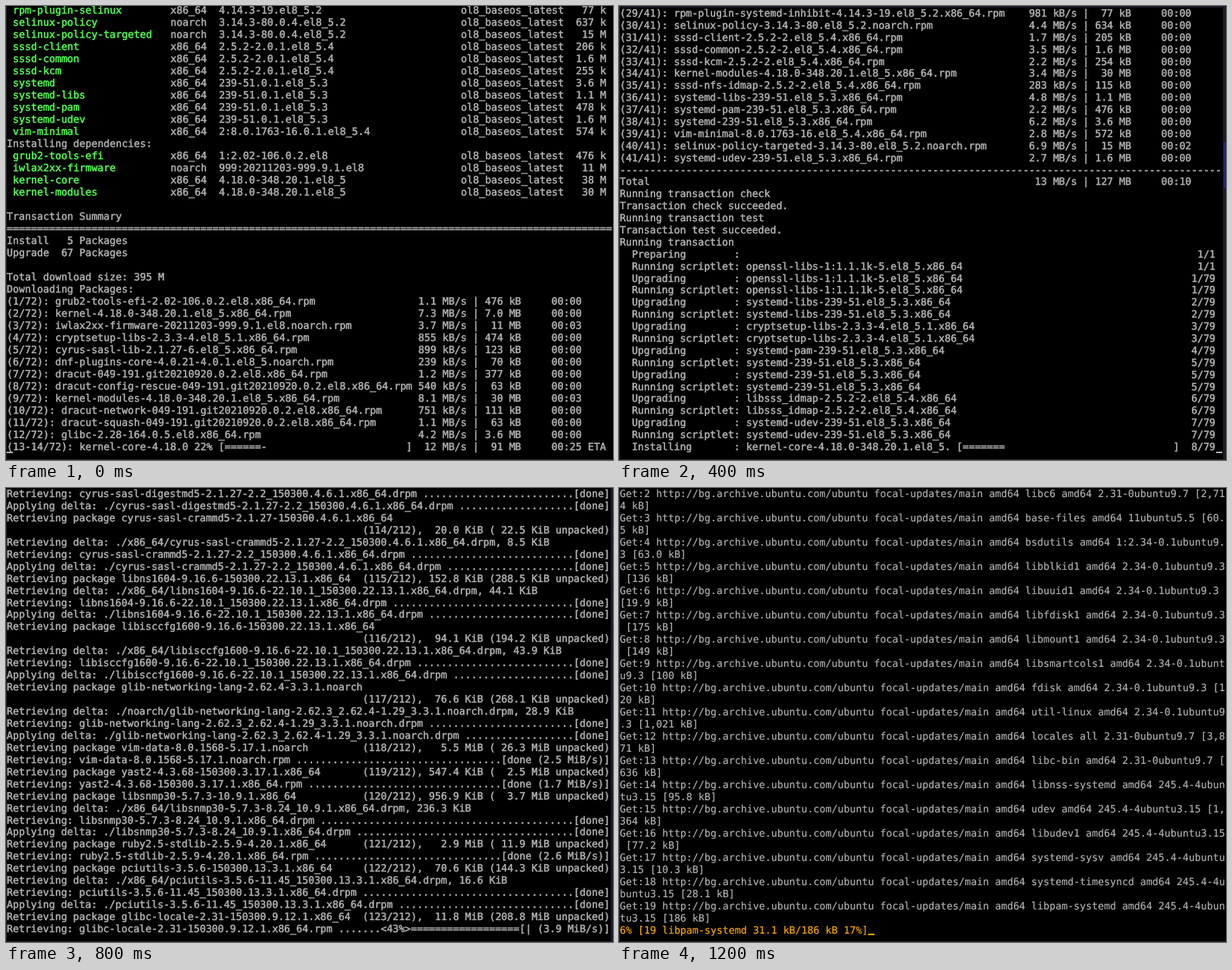
An HTML page for the animation above (1.6 s loop, 801 by 599 pixels).

```html
<!DOCTYPE html>
<html lang="en">
<head>
<meta charset="utf-8">
<title>Package updates</title>
<style>
  html, body { margin: 0; width: 100%; height: 100%; overflow: hidden; background: #000; }
  svg { display: block; width: 801px; height: 599px; }
  text {
    font-family: "DejaVu Sans Mono", "Liberation Mono", monospace;
    white-space: pre;
    text-rendering: geometricPrecision;
  }
</style>
</head>
<body>
<svg id="stage" viewBox="0 0 801 599"></svg>
<script>
const NS = "http://www.w3.org/2000/svg";
const stage = document.getElementById("stage");
const HOLD = 400;
const GREY = "#b2b2b2", GREEN = "#55ff55", AMBER = "#ffaa00";

function add(parent, tag, attrs, text) {
  const el = document.createElementNS(NS, tag);
  for (const k in attrs) el.setAttribute(k, attrs[k]);
  if (text) el.textContent = text;
  parent.appendChild(el);
  return el;
}

// A row is a string or a list of [colour, string] runs.
function screen({ rows, top, cell, pitch, weight, cursor }) {
  const g = add(stage, "g", {
    "font-size": cell / 0.60205, "stroke-width": weight, visibility: "hidden"
  });
  rows.forEach((row, i) => {
    let col = 0;
    for (const [fill, s] of Array.isArray(row) ? row : [[GREY, row]]) {
      if (s.trim()) add(g, "text", { x: 1 + col * cell, y: top + i * pitch, fill, stroke: fill }, s);
      col += s.length;
    }
  });
  if (cursor) add(g, "rect", { x: 1 + cursor[0] * cell, y: 588, width: 8, height: 2, fill: cursor[1] });
  return g;
}

const lines = s => s.trim().split("\n");
const fields = s => lines(s).map(l => l.split(" "));
const unit = s => s.replace(/([kM]\S*)$/, " $1");

// dnf download line
const fetched = (name, rate, size, time) =>
  name.padEnd(67) + unit(rate).padStart(9) + " | " + unit(size).padStart(6) + "     " + time;
const downloads = (first, total, list) => fields(list).map(([name, rate, size, time = "00:00"], i) =>
  fetched(`(${first + i}/${total}): ${name}.rpm`, rate, size, time));

// dnf package table
const table = list => fields(list).map(([name, arch, version, size]) => [
  [GREEN, (" " + name).padEnd(27)],
  [GREY, arch.padEnd(8) + version.padEnd(40) + "ol8_baseos_latest  " + unit(size).padStart(5)]
]);

const upgradeList = [
  ...table(`
rpm-plugin-selinux x86_64 4.14.3-19.el8_5.2 77k
selinux-policy noarch 3.14.3-80.0.4.el8_5.2 637k
selinux-policy-targeted noarch 3.14.3-80.0.4.el8_5.2 15M
sssd-client x86_64 2.5.2-2.0.1.el8_5.4 206k
sssd-common x86_64 2.5.2-2.0.1.el8_5.4 1.6M
sssd-kcm x86_64 2.5.2-2.0.1.el8_5.4 255k
systemd x86_64 239-51.0.1.el8_5.3 3.6M
systemd-libs x86_64 239-51.0.1.el8_5.3 1.1M
systemd-pam x86_64 239-51.0.1.el8_5.3 478k
systemd-udev x86_64 239-51.0.1.el8_5.3 1.6M
vim-minimal x86_64 2:8.0.1763-16.0.1.el8_5.4 574k`),
  "Installing dependencies:",
  ...table(`
grub2-tools-efi x86_64 1:2.02-106.0.2.el8 476k
iwlax2xx-firmware noarch 999:20211203-999.9.1.el8 11M
kernel-core x86_64 4.18.0-348.20.1.el8_5 38M
kernel-modules x86_64 4.18.0-348.20.1.el8_5 30M`),
  "",
  "Transaction Summary",
  "=".repeat(100),
  "Install   5 Packages",
  "Upgrade  67 Packages",
  "",
  "Total download size: 395 M",
  "Downloading Packages:",
  ...downloads(1, 72, `
grub2-tools-efi-2.02-106.0.2.el8.x86_64 1.1MB/s 476kB
kernel-4.18.0-348.20.1.el8_5.x86_64 7.3MB/s 7.0MB
iwlax2xx-firmware-20211203-999.9.1.el8.noarch 3.7MB/s 11MB 00:03
cryptsetup-libs-2.3.3-4.el8_5.1.x86_64 855kB/s 474kB
cyrus-sasl-lib-2.1.27-6.el8_5.x86_64 899kB/s 123kB
dnf-plugins-core-4.0.21-4.0.1.el8_5.noarch 239kB/s 70kB
dracut-049-191.git20210920.0.2.el8.x86_64 1.2MB/s 377kB
dracut-config-rescue-049-191.git20210920.0.2.el8.x86_64 540kB/s 63kB
kernel-modules-4.18.0-348.20.1.el8_5.x86_64 8.1MB/s 30MB 00:03
dracut-network-049-191.git20210920.0.2.el8.x86_64 751kB/s 111kB
dracut-squash-049-191.git20210920.0.2.el8.x86_64 1.1MB/s 63kB
glibc-2.28-164.0.5.el8.x86_64 4.2MB/s 3.6MB`),
  fetched("(13-14/72): kernel-core-4.18.0 22% [" + "======-".padEnd(30) + "]", "12MB/s", "91MB", "00:25 ETA")
];

// dnf transaction line
const step = (verb, what, count) =>
  (("  " + verb).padEnd(19) + ": " + what).padEnd(99 - count.length) + count;
const script = (verb, what, count) => [step(verb, what, count), step("Running scriptlet", what, count)];

const transaction = [
  ...downloads(29, 41, `
rpm-plugin-systemd-inhibit-4.14.3-19.el8_5.2.x86_64 981kB/s 77kB
selinux-policy-3.14.3-80.el8_5.2.noarch 4.4MB/s 634kB
sssd-client-2.5.2-2.el8_5.4.x86_64 1.7MB/s 205kB
sssd-common-2.5.2-2.el8_5.4.x86_64 3.5MB/s 1.6MB
sssd-kcm-2.5.2-2.el8_5.4.x86_64 2.2MB/s 254kB
kernel-modules-4.18.0-348.20.1.el8_5.x86_64 3.4MB/s 30MB 00:08
sssd-nfs-idmap-2.5.2-2.el8_5.4.x86_64 283kB/s 115kB
systemd-libs-239-51.el8_5.3.x86_64 4.8MB/s 1.1MB
systemd-pam-239-51.el8_5.3.x86_64 2.2MB/s 476kB
systemd-239-51.el8_5.3.x86_64 6.2MB/s 3.6MB
vim-minimal-8.0.1763-16.el8_5.4.x86_64 2.8MB/s 572kB
selinux-policy-targeted-3.14.3-80.el8_5.2.noarch 6.9MB/s 15MB 00:02
systemd-udev-239-51.el8_5.3.x86_64 2.7MB/s 1.6MB`),
  "-".repeat(100),
  fetched("Total", "13MB/s", "127MB", "00:10"),
  "Running transaction check",
  "Transaction check succeeded.",
  "Running transaction test",
  "Transaction test succeeded.",
  "Running transaction",
  step("Preparing", "", "1/1"),
  step("Running scriptlet", "openssl-libs-1:1.1.1k-5.el8_5.x86_64", "1/1"),
  ...lines(`
openssl-libs-1:1.1.1k-5.el8_5.x86_64
systemd-libs-239-51.el8_5.3.x86_64
cryptsetup-libs-2.3.3-4.el8_5.1.x86_64`).flatMap((p, i) => script("Upgrading", p, `${i + 1}/79`)),
  step("Upgrading", "systemd-pam-239-51.el8_5.3.x86_64", "4/79"),
  step("Running scriptlet", "systemd-239-51.el8_5.3.x86_64", "5/79"),
  ...lines(`
systemd-239-51.el8_5.3.x86_64
libsss_idmap-2.5.2-2.el8_5.4.x86_64
systemd-udev-239-51.el8_5.3.x86_64`).flatMap((p, i) => script("Upgrading", p, `${i + 5}/79`)),
  step("Installing", "kernel-core-4.18.0-348.20.1.el8_5. [" + "=".repeat(7).padEnd(35) + "]", "8/79")
];

// zypper lines
const dotted = (head, tail = "[done]") => (head + " ").padEnd(100 - tail.length, ".") + tail;
const apply = file => [dotted("Retrieving: " + file), dotted("Applying delta: ./" + file)];
function pack(name, n, size, full) {
  const head = "Retrieving package " + name;
  const info = `(${n}/212), ${size.padStart(9)} (${full.padStart(9)} unpacked)`;
  return head.length < 59 ? [head.padEnd(59) + info] : [head, info.padStart(100)];
}
const delta = (file, arch, size) =>
  [`Retrieving delta: ./${arch}/${file}.${arch}.drpm, ${size} KiB`, ...apply(`${file}.${arch}.drpm`)];
const whole = (file, rate) => dotted(`Retrieving: ${file}.rpm`, `[done (${rate} MiB/s)]`);

const deltas = [
  ...apply("cyrus-sasl-digestmd5-2.1.27-2.2_150300.4.6.1.x86_64.drpm"),
  ...pack("cyrus-sasl-crammd5-2.1.27-150300.4.6.1.x86_64", 114, "20.0 KiB", "22.5 KiB"),
  ...delta("cyrus-sasl-crammd5-2.1.27-2.2_150300.4.6.1", "x86_64", 8.5),
  ...pack("libns1604-9.16.6-150300.22.13.1.x86_64", 115, "152.8 KiB", "288.5 KiB"),
  ...delta("libns1604-9.16.6-22.10.1_150300.22.13.1", "x86_64", 44.1),
  ...pack("libisccfg1600-9.16.6-150300.22.13.1.x86_64", 116, "94.1 KiB", "194.2 KiB"),
  ...delta("libisccfg1600-9.16.6-22.10.1_150300.22.13.1", "x86_64", 43.9),
  ...pack("glib-networking-lang-2.62.4-3.3.1.noarch", 117, "76.6 KiB", "268.1 KiB"),
  ...delta("glib-networking-lang-2.62.3_2.62.4-1.29_3.3.1", "noarch", 28.9),
  ...pack("vim-data-8.0.1568-5.17.1.noarch", 118, "5.5 MiB", "26.3 MiB"),
  whole("vim-data-8.0.1568-5.17.1.noarch", 2.5),
  ...pack("yast2-4.3.68-150300.3.17.1.x86_64", 119, "547.4 KiB", "2.5 MiB"),
  whole("yast2-4.3.68-150300.3.17.1.x86_64", 1.7),
  ...pack("libsnmp30-5.7.3-10.9.1.x86_64", 120, "956.9 KiB", "3.7 MiB"),
  ...delta("libsnmp30-5.7.3-8.24_10.9.1", "x86_64", 236.3),
  ...pack("ruby2.5-stdlib-2.5.9-4.20.1.x86_64", 121, "2.9 MiB", "11.9 MiB"),
  whole("ruby2.5-stdlib-2.5.9-4.20.1.x86_64", 2.6),
  ...pack("pciutils-3.5.6-150300.13.3.1.x86_64", 122, "70.6 KiB", "144.3 KiB"),
  ...delta("pciutils-3.5.6-11.45_150300.13.3.1", "x86_64", 16.6),
  ...pack("glibc-locale-2.31-150300.9.12.1.x86_64", 123, "11.8 MiB", "208.8 MiB"),
  dotted("Retrieving: glibc-locale-2.31-150300.9.12.1.x86_64.rpm",
    "<43%>" + "=".repeat(18) + "[| (3.9 MiB/s)]")
];

// apt lines, wrapped at 100 columns
const aptGets = fields(`
libc6 2.31-0ubuntu9.7 2,714
base-files 11ubuntu5.5 60.5
bsdutils 1:2.34-0.1ubuntu9.3 63.0
libblkid1 2.34-0.1ubuntu9.3 136
libuuid1 2.34-0.1ubuntu9.3 19.9
libfdisk1 2.34-0.1ubuntu9.3 175
libmount1 2.34-0.1ubuntu9.3 149
libsmartcols1 2.34-0.1ubuntu9.3 100
fdisk 2.34-0.1ubuntu9.3 120
util-linux 2.34-0.1ubuntu9.3 1,021
locales 2.31-0ubuntu9.7 3,871
libc-bin 2.31-0ubuntu9.7 636
libnss-systemd 245.4-4ubuntu3.15 95.8
udev 245.4-4ubuntu3.15 1,364
libudev1 245.4-4ubuntu3.15 77.2
systemd-sysv 245.4-4ubuntu3.15 10.3
systemd-timesyncd 245.4-4ubuntu3.15 28.1
libpam-systemd 245.4-4ubuntu3.15 186`).flatMap(([name, version, size], i) => {
  const arch = name === "locales" ? "all" : "amd64";
  const s = `Get:${i + 2} http://bg.archive.ubuntu.com/ubuntu focal-updates/main amd64 ` +
    `${name} ${arch} ${version} [${size} kB]`;
  return [s.slice(0, 100), s.slice(100)];
});
const status = "6% [19 libpam-systemd 31.1 kB/186 kB 17%]";

add(stage, "rect", { width: 801, height: 599, fill: "#000" });
const screens = [
  screen({ rows: upgradeList, top: 10, cell: 8, pitch: 16, weight: 0.5, cursor: [0, GREY] }),
  screen({ rows: transaction, top: 14, cell: 7.95, pitch: 15.89, weight: 0.5, cursor: [99, GREY] }),
  screen({ rows: deltas, top: 12, cell: 7.97, pitch: 15.945, weight: 0.5 }),
  screen({
    rows: [...aptGets, [[AMBER, status]]],
    top: 12, cell: 8, pitch: 16, weight: 0.15, cursor: [status.length, AMBER]
  })
];

// window edges
const EDGE = "#1c1c2b";
add(screens[1], "rect", { width: 801, height: 2, fill: EDGE });
add(screens[1], "rect", { x: 797, width: 4, height: 599, fill: EDGE });
add(screens[1], "rect", { x: 798, y: 180, width: 3, height: 60, fill: "#25257a" });
add(screens[2], "rect", { x: 798, width: 3, height: 599, fill: EDGE });
add(stage, "path", { d: "M.5 0V598.5H801", fill: "none", stroke: "#2a2a30" });

function render(ms) {
  const now = Math.floor(ms / HOLD) % screens.length;
  screens.forEach((g, i) => g.setAttribute("visibility", i === now ? "visible" : "hidden"));
}
function tick() {
  render(performance.now());
  requestAnimationFrame(tick);
}
tick();
</script>
</body>
</html>
```
